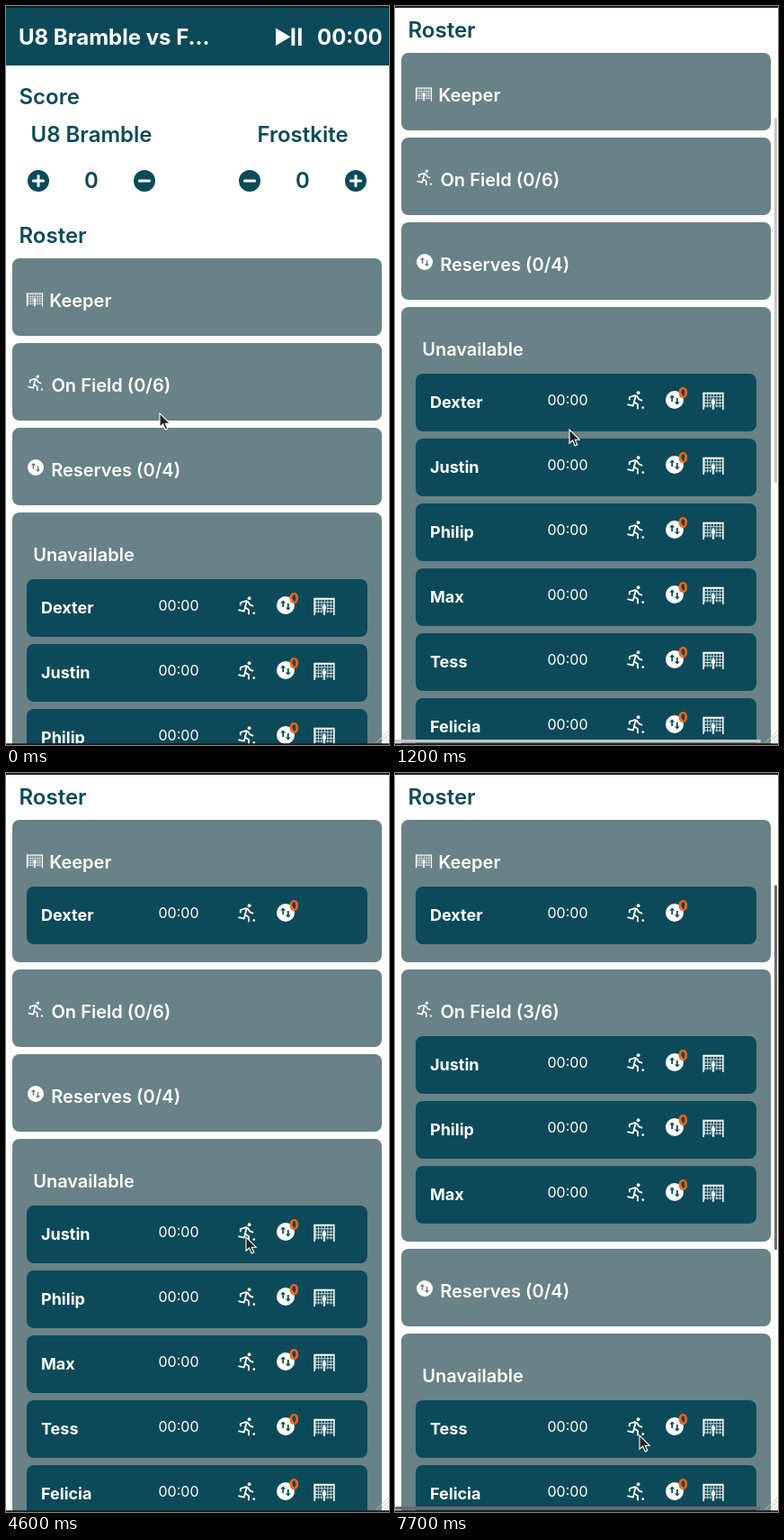
An HTML page for the animation above (8 s loop, 426 by 820 pixels).

```html
<!DOCTYPE html>
<html lang="en">
<head>
<meta charset="utf-8">
<title>Match roster</title>
<style>
  html, body { margin: 0; width: 100%; height: 100%; overflow: hidden; background: #fff; }
  svg { display: block; }
  text { font-family: Inter, Roboto, sans-serif; font-weight: 600; white-space: pre; }
  .h { font-size: 24px; fill: #0d4a59; }
  .head { font-size: 24px; font-weight: 700; fill: #fff; }
  .title { font-size: 20px; fill: #fff; }
  .name { font-size: 18px; font-weight: 700; fill: #fff; }
  .time { font-size: 16px; font-weight: 400; fill: #fff; }
  .badge { font-size: 15.5px; font-weight: 800; fill: #ff620d; }
  .mid { text-anchor: middle; }
  .row { color: #0d4a59; }
  .card { color: #688287; }
</style>
</head>
<body>
<svg width="426" height="820" viewBox="0 0 426 820">
  <defs>
    <pattern id="net" width="3.4" height="3.4" x="-10.2" y="-8.6" patternUnits="userSpaceOnUse">
      <path d="M0 .5H3.4M.5 0V3.4" stroke="#fff" stroke-width=".9"/>
    </pattern>
    <g id="run" fill="none" stroke="#fff" stroke-width="1.8" stroke-linejoin="round">
      <circle cx="2.6" cy="-7.8" r="1.9" fill="#fff" stroke="none"/>
      <path d="M-7.2 .2V-3L-1.2-4.8 1-4.2 3.4-.6 7.2 .8M-.2-4.2L-2.2 2.2 2 5V10.2M-1.6 1.6L-3.2 6.6-9.6 5.2"/>
      <circle cx="7.8" cy="8.6" r="1.3" fill="#fff" stroke="none"/>
    </g>
    <g id="swap">
      <circle r="10" fill="#fff"/>
      <path fill="currentColor" d="M-2.8-5.6L-5.8-2.4H-3.7V2H-1.9V-2.4H.2ZM2.8 5.6L5.8 2.4H3.7V-2H1.9V2.4H-.2Z"/>
    </g>
    <g id="goal">
      <rect x="-10.2" y="-8.6" width="20.4" height="15.6" fill="url(#net)" opacity=".85"/>
      <path fill="none" stroke="#fff" stroke-width="1.5" d="M-10.9 9.6V-9H10.9V9.6"/>
      <path fill="#fff" stroke="currentColor" stroke-width=".8" d="M0-4.4L1.5-2.4 2.8 1.4 1.5 4V9.6H-1.5V4L-2.8 1.4-1.5-2.4Z"/>
    </g>
    <g id="minus">
      <circle r="12" fill="#0d4a59"/>
      <path d="M-5.6 0H5.6" stroke="#fff" stroke-width="3" stroke-linecap="round"/>
    </g>
    <g id="plus">
      <use href="#minus"/>
      <path d="M0-5.6V5.6" stroke="#fff" stroke-width="3" stroke-linecap="round"/>
    </g>
  </defs>

  <g id="page">
    <rect width="426" height="66" fill="#0d4a59"/>
    <text class="head" x="14" y="43">U8 Bramble vs F...</text>
    <path fill="#fff" d="M300 24.5L316.5 34.2 300 44ZM317.5 24.5H321.3V44H317.5ZM325 24.5H328.8V44H325Z"/>
    <text class="head" x="346" y="43">00:00</text>

    <text class="h" x="14.5" y="109">Score</text>
    <text class="h mid" x="95" y="151">U8 Bramble</text>
    <text class="h mid" x="330" y="151">Frostkite</text>
    <text class="h mid" x="95" y="202">0</text>
    <text class="h mid" x="330" y="202">0</text>
    <use href="#plus" x="36" y="194"/>
    <use href="#minus" x="154" y="194"/>
    <use href="#minus" x="271" y="194"/>
    <use href="#plus" x="389" y="194"/>

    <text class="h" x="14.5" y="263">Roster</text>
    <g id="cards"></g>
  </g>

  <g id="bars">
    <rect id="vbar" x="422" width="3" height="405" rx="1.5"/>
    <rect y="814" width="407" height="3.5" rx="1.5"/>
  </g>
  <path d="M412 817.5L425.5 804M416.5 817.5L425.5 808.5M421 817.5L425.5 813" stroke="#c4c9ca"/>
  <path d="M0 0H426V2H0ZM0 818.2H426V820H0Z" fill="#1b1b1b"/>
  <path id="cursor" d="M0 0V15.2L3.6 12 6.2 18 8.8 16.8 6.3 11.2H11.2Z" fill="#222" stroke="#fff" stroke-width="1.1"/>
</svg>

<script>
const LOOP = 8000, STEP = 100;
const players = ['Dexter', 'Justin', 'Philip', 'Max', 'Tess', 'Felicia'];

// Each click moves the next player up: first to keeper, the others to the field.
const clicks = [3200, 5100, 6600, 7500];
const scrollStart = 600, scrollTime = 600, scrollEnd = 228;

// Pointer moves: start, duration, x, y.
const home = [171, 452];
const moves = [
  [100, 200, 194, 470],
  [1700, 900, 361, 435],
  [3700, 200, 308, 562],
  [4100, 500, 267, 515],
  [5400, 500, 267, 585],
  [7100, 300, 267, 655],
  [7500, 200, 272, 735]
];

const $ = id => document.getElementById(id);
const clamp = v => Math.min(1, Math.max(0, v));
const progress = (t, start, time) => clamp((t - start) / time);
const easeOut = p => 1 - (1 - p) ** 1.24;

function pointer(t) {
  let [x, y] = home;
  for (const [start, time, toX, toY] of moves) {
    const p = easeOut(progress(t, start, time));
    x += (toX - x) * p;
    y += (toY - y) * p;
  }
  return [x, y];
}

// Scrollbars fade in on activity and out again a second later.
const pulse = (t, start) => progress(t, start, 300) - progress(t, start + 1000, 500);
const barOpacity = t => clamp([scrollStart, ...clicks.map(c => c - 100)]
  .reduce((sum, start) => sum + pulse(t, start), 0));

const icon = (id, x, y, s = 1) => `<use href="#${id}" transform="translate(${x} ${y}) scale(${s})"/>`;

function row(name, y, withGoal) {
  return `<g class="row" transform="translate(16 ${y})">
    <rect width="379" height="64" rx="8" fill="currentColor"/>
    <text class="name" x="16" y="38">${name}</text>
    <text class="time" x="146.5" y="35">00:00</text>
    ${icon('run', 245, 29)}${icon('swap', 288, 29)}
    <text class="badge mid" x="297.3" y="26.5">0</text>
    ${withGoal ? icon('goal', 331, 30.5) : ''}</g>`;
}

function card(top, height, mark, x, title, rows) {
  return `<g class="card" transform="translate(7 ${top})">
    <rect width="411" height="${height}" rx="8" fill="currentColor"/>
    ${mark}<text class="title" x="${x}" y="54">${title}</text>${rows}</g>`;
}

function drawCards(moved) {
  const keeper = players.slice(0, Math.min(moved, 1));
  const field = players.slice(1, Math.max(moved, 1));
  const sections = [
    [icon('goal', 25, 46, .78), 41.2, 'Keeper', keeper],
    [icon('run', 26, 44, .88), 43.5, `On Field (${field.length}/6)`, field],
    [icon('swap', 26, 44, .9), 43.2, 'Reserves (0/4)', []],
    ['', 23.2, 'Unavailable', players.slice(moved)]
  ];
  let top = 280, out = '';
  for (const [mark, x, title, list] of sections) {
    const height = 86 + 72 * list.length;
    const rows = list.map((n, i) => row(n, 74 + 72 * i, title !== 'Keeper')).join('');
    out += card(top, height, mark, x, title, rows);
    top += height + 8;
  }
  $('cards').innerHTML = out;
}

let shown = -1;
function draw(now) {
  const t = Math.floor(now % LOOP / STEP) * STEP;
  const moved = clicks.filter(c => t >= c).length;
  if (moved !== shown) drawCards(shown = moved);

  const scroll = Math.round(scrollEnd * easeOut(progress(t, scrollStart, scrollTime)));
  $('page').setAttribute('transform', `translate(0 ${-scroll})`);
  $('cursor').setAttribute('transform', `translate(${pointer(t)})`);
  $('vbar').setAttribute('y', 2 + scroll * .536);
  $('bars').setAttribute('opacity', barOpacity(t));
  $('bars').setAttribute('fill', t < clicks[0] - STEP ? '#c6c6c6' : '#6a6a6a');
}

const start = performance.now();
function tick() {
  draw(performance.now() - start);
  requestAnimationFrame(tick);
}
tick();
</script>
</body>
</html>
```
